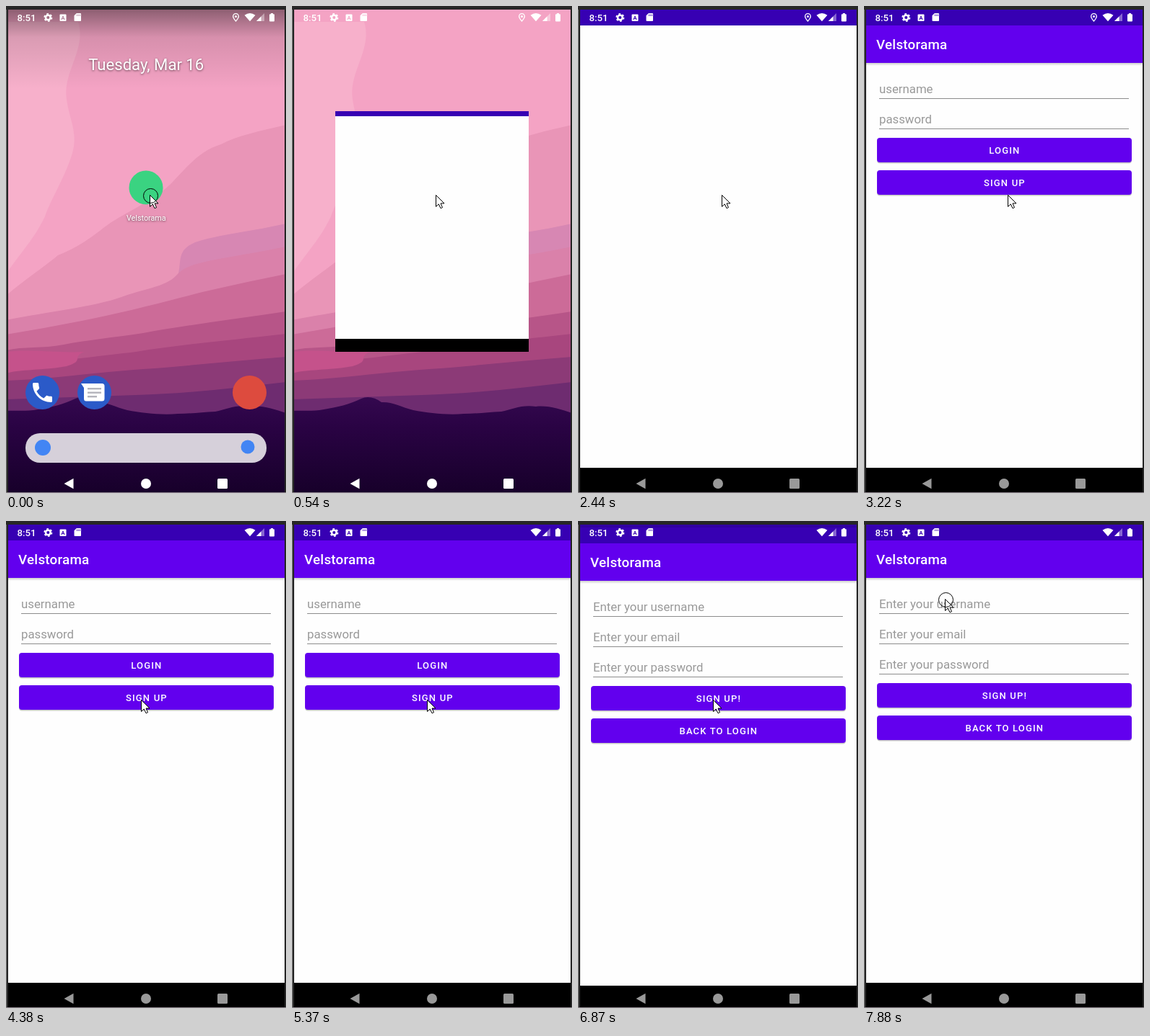
These frames come from a looping animation (388x676 px, 8 s). An HTML page:

```html
<!DOCTYPE html>
<html lang="en">
<head>
<meta charset="utf-8">
<title>App sign-up walkthrough</title>
<style>
  html, body { margin: 0; width: 100%; height: 100%; overflow: hidden; background: #262626; }
  svg { display: block; width: 388px; height: 676px; }
  text { font-family: Roboto, sans-serif; }
  .hint { font-size: 16.8px; fill: #999; }
  .label { font-size: 13px; font-weight: 500; letter-spacing: 1.16px; fill: #fff; text-anchor: middle; }
  .title { font-size: 18.8px; font-weight: 500; letter-spacing: .25px; fill: #fff; }
  .crisp { shape-rendering: crispEdges; }
</style>
</head>
<body>
<svg id="stage" viewBox="0 0 388 676" xmlns="http://www.w3.org/2000/svg"></svg>
<script>
const APP = 'Velstorama';
const LOOP = 8000;

const rect = (x, y, w, h, fill, more = '') =>
  `<rect x="${x}" y="${y}" width="${w}" height="${h}" fill="${fill}" ${more}/>`;
const circle = (x, y, r, fill, more = '') =>
  `<circle cx="${x}" cy="${y}" r="${r}" fill="${fill}" ${more}/>`;
const path = (d, fill, more = '') => `<path d="${d}" fill="${fill}" ${more}/>`;

// Wallpaper: each ridge is a top edge filled down to the bottom.
const ridges = [
  ['#e995b7', 'M388 165C350 174 320 180 298 192C270 200 252 222 232 243C205 272 165 285 135 308C110 328 92 338 72 346C48 366 28 378 0 402'],
  ['#da81aa', 'M388 334C350 342 315 347 285 353C262 358 246 362 236 374C222 390 185 394 160 404C120 418 60 424 0 436'],
  ['#cc6b98', 'M388 372C340 382 290 392 245 404C200 416 150 428 105 437C70 444 35 450 0 456'],
  ['#b75588', 'M388 424C320 434 250 443 190 454C150 460 110 464 80 470C50 476 25 472 0 478'],
  ['#a8467e', 'M388 455C310 464 240 470 180 480C130 486 60 494 0 500'],
  ['#8c3a77', 'M388 487C320 492 250 500 190 504C130 508 60 518 0 520'],
  ['#6e2c70', 'M388 522C320 530 250 538 180 540C120 542 60 544 0 546'],
  ['url(#hill)', 'M388 565C372 560 355 554 338 556C318 553 305 560 290 563C270 564 255 566 238 566C215 568 190 565 168 561C150 556 138 549 124 550C115 543 104 541 96 545C80 553 62 557 44 560C28 563 14 561 0 562']
];
const wallpaper = rect(0, 0, 388, 676, '#f4a3c4')
  + path('M0 22H100C112 60 78 92 84 130C88 158 100 176 92 204C82 238 62 268 54 292C40 322 22 340 0 372Z', '#f7b0cb')
  + ridges.map(([color, d], i) =>
      path(d + 'V676H388Z', color)
      + (i === 0 ? path('M388 302C345 312 290 318 262 328C236 340 244 352 238 376C270 360 340 350 388 336Z', '#d787b3') : '')
      + (i === 4 ? path('M0 480C40 476 70 482 108 480C90 488 110 492 84 500C50 506 20 504 0 510Z', '#c5528b') : '')
    ).join('');

const handset = 'M6.62 10.79c1.44 2.83 3.76 5.14 6.59 6.59l2.2-2.2c.27-.27.67-.36 1.02-.24 1.12.37 2.33.57 3.57.57.55 0 1 .45 1 1V20c0 .55-.45 1-1 1-9.39 0-17-7.61-17-17 0-.55.45-1 1-1h3.5c.55 0 1 .45 1 1 0 1.25.2 2.45.57 3.57.11.35.03.74-.25 1.02z';

const launcher = `<g id="launcher">
  ${rect(0, 5, 388, 110, 'url(#scrim)')}
  <g fill="#fff" text-anchor="middle" style="filter:drop-shadow(0 1px 1.5px rgba(0,0,0,.55))">
    <text x="194.2" y="89" font-size="22.1">Tuesday, Mar 16</text>
    <text x="194.3" y="297.5" font-size="10.8">${APP}</text>
  </g>
  ${circle(194, 252, 26, '#fff', 'id="glow" opacity=".35"')}
  ${circle(194, 252, 23.5, '#3ad381')}
  ${circle(50.5, 536.5, 23.5, '#2b5ac8')}
  ${path(handset, '#fff', 'transform="translate(32.5 518.5) scale(1.5)"')}
  ${circle(122.5, 536.5, 23.5, '#2b5ac8')}
  ${path('M104 524H133Q136.500 524 136.500 527.500V545Q136.500 548.500 133 548.500H111Q108 548.500 108 545V530Z', '#fff')}
  ${[530, 535.500, 541].map((y, i) => rect(113, y, i === 2 ? 13 : 19, 2.4, '#b4b4bc')).join('')}
  ${circle(337.5, 536.5, 23.5, '#dd4b3e')}
  ${rect(27, 593, 334, 41, '#d6d0da', 'rx="20"')}
  ${circle(51, 613, 11, '#4285f4')}
  ${circle(335, 612, 9.5, '#4285f4')}
</g>`;

const field = (y, hint) =>
  `<text class="hint" x="21" y="${y}">${hint}</text>` + rect(21, y + 7, 346, 1, '#8c8c8c', 'class="crisp"');
const button = (y, label, extra = '') =>
  rect(18, y + 1.5, 353, 34, '#000', 'rx="4" opacity=".22"')
  + rect(18, y, 353, 34, '#6200ee', 'rx="4"') + extra
  + `<text class="label" x="194.9" y="${y + 22}">${label}</text>`;
const page = body =>
  rect(3, 5, 383, 636, '#fefefe', 'class="crisp"')
  + rect(3, 5, 383, 22, '#3700b3', 'class="crisp"')
  + rect(3, 79, 383, 4, 'url(#drop)')
  + rect(3, 27, 383, 52, '#6200ee', 'class="crisp"')
  + `<text class="title" x="17" y="60">${APP}</text>` + body;

const ripple = `<g clip-path="url(#pill)">${circle(188, 249, 1, '#fff', 'id="ripple"')}</g>`;
const login = page(field(121, 'username') + field(163, 'password')
  + button(183, 'LOGIN') + button(228, 'SIGN UP', ripple));
const signup = page(field(121, 'Enter your username') + field(163, 'Enter your email')
  + field(205, 'Enter your password') + button(225, 'SIGN UP!') + button(270, 'BACK TO LOGIN'));

const navIcons = path('M80.500 663L93.500 655.800V670.200Z', 'inherit', 'stroke-linejoin="round"').replace('fill="inherit"', '')
  + '<circle cx="194" cy="663" r="7"/><rect x="293" y="656" width="14" height="14" rx="1.5"/>';

const statusIcons = `<g fill="#fff">
  <text x="15.6" y="21" font-size="13.2" font-weight="500">8:51</text>
  <circle cx="58.300" cy="16" r="3.300" fill="none" stroke="#fff" stroke-width="2.500"/>
  <circle cx="58.300" cy="16" r="5.100" fill="none" stroke="#fff" stroke-width="1.800" stroke-dasharray="2.670"/>
  <rect x="74.500" y="11.500" width="9" height="9.500" rx="1"/>
  <text id="letter" x="79" y="19" font-size="8" font-weight="700" text-anchor="middle">A</text>
  <path d="M97.800 10H103Q104 10 104 11V20Q104 21 103 21H95.500Q94.500 21 94.500 20V13.300Z"/>
  <path id="slots" d="M98.500 11.500V14M100.500 11.500V14M102.500 11.500V14" stroke-width=".8"/>
  <path id="pin" fill-rule="evenodd" d="M318.500 10C321.200 10 323 12 323 14.500C323 17.300 318.500 22 318.500 22S314 17.300 314 14.500C314 12 315.800 10 318.500 10ZM318.500 11.300A3.100 3.100 0 0 0 315.400 14.500C315.400 16.200 317.500 18.900 318.500 20C319.500 18.900 321.600 16.200 321.600 14.500A3.100 3.100 0 0 0 318.500 11.300ZM317 14.500A1.500 1.500 0 1 1 320 14.500A1.500 1.500 0 1 1 317 14.500Z"/>
  <path d="M330.500 12.800Q338 7.200 345.500 12.800L338 21.300Z"/>
  <path d="M358 10V21H347Z" opacity=".4"/><path d="M353.500 14.500V21H347Z"/>
  <path d="M367 10H370V11.300H371Q372 11.300 372 12.300V20.500Q372 21.500 371 21.500H366Q365 21.500 365 20.500V12.300Q365 11.300 366 11.300H367Z"/>
</g>`;

const stage = document.getElementById('stage');
stage.innerHTML = `<defs>
  <linearGradient id="scrim" x2="0" y2="1"><stop stop-opacity=".42"/><stop offset=".35" stop-opacity=".12"/><stop offset="1" stop-opacity="0"/></linearGradient>
  <linearGradient id="hill" x2="0" y2="1"><stop stop-color="#34084f"/><stop offset=".3" stop-color="#2a0344"/><stop offset="1" stop-color="#17002a"/></linearGradient>
  <linearGradient id="drop" x2="0" y2="1"><stop stop-opacity=".2"/><stop offset="1" stop-opacity="0"/></linearGradient>
  <clipPath id="pill"><rect x="18" y="228" width="353" height="34" rx="4"/></clipPath>
  <clipPath id="reveal"><rect id="shade" width="388" height="676"/></clipPath>
</defs>
<g id="home">${wallpaper}${launcher}</g>
<g id="window" class="crisp">
  <rect id="winNav" fill="#000"/><rect id="winBody" fill="#fefefe"/><rect id="winBar" fill="#3700b3"/>
</g>
<g id="login">${login}</g>
<rect id="dim" x="3" y="5" width="383" height="636" opacity=".1"/>
<g id="nav">${navIcons}</g>
<g id="signup" clip-path="url(#reveal)"><g id="slide">${signup}</g></g>
${statusIcons}
<g class="crisp">
  ${rect(0, 0, 388, 5, '#272727')}${rect(0, 5, 3, 671, '#252525')}${rect(0, 5, 1, 671, '#6b6b6b')}
  ${rect(386, 5, 2, 671, '#252525')}${rect(0, 675, 388, 1, '#8d858d')}
</g>
<g id="pointer">
  <path d="M.5 .5V16.500L4.300 13L7 18.800L9.500 17.700L7 12H12Z" fill="#fff" stroke="#000" stroke-linejoin="round"/>
  <circle id="ring" cx="1.500" cy="1.500" r="10" fill="none" stroke="#000"/>
</g>`;

const el = {};
stage.querySelectorAll('[id]').forEach(n => el[n.id] = n);
const set = (id, attrs) => { for (const k in attrs) el[id].setAttribute(k, attrs[k]); };
const show = (id, on) => { el[id].style.display = on ? '' : 'none'; };
const within = (t, a, b) => t >= a && t < b;

// Latest entry whose start time has passed.
const held = (steps, t) => {
  let now = steps[0];
  for (const s of steps) if (t >= s[0]) now = s;
  return now.slice(1);
};

// left, top, bar bottom, body bottom, right, bottom
const growth = [
  [540, 60, 146, 153, 462, 328, 480],
  [690, 9, 24, 37, 632, 380, 666],
  [830, 4, 9, 28, 639, 385, 673],
  [950, 3, 5, 27, 641, 386, 675]
];
const route = [
  [0, 199, 262], [3870, 197, 258], [4020, 193, 255], [4140, 190, 252], [4260, 188, 250],
  [4380, 187, 248], [7240, 165, 186], [7360, 137, 117], [7500, 119, 110], [7630, 112, 108]
];
const ink = [[0, '#fff'], [1430, '#d0d0d0'], [2440, '#999']];
// new page offset, reveal edge, old page offset
const handover = [[6720, 21, 175, -3], [6870, 4, 0, -11], [6990, 0, 0, 0]];
const waves = [[0, 0, 0], [5130, 110, .2], [5250, 200, .14], [5370, 0, 0]];

function draw(t) {
  show('home', t < 950);
  show('launcher', t < 540);
  show('glow', within(t, 280, 400));

  show('window', t >= 540);
  const [x, top, bar, body, right, end] = held(growth, t);
  const width = right - x;
  set('winBar', { x, y: top, width, height: bar - top });
  set('winBody', { x, y: bar, width, height: body - bar });
  set('winNav', { x, y: body, width, height: end - body });

  const [rise, edge, lift] = held(handover, t);
  show('login', within(t, 3220, 6990));
  set('login', { transform: `translate(0 ${t >= 6720 ? lift : 0})` });
  show('dim', within(t, 6720, 6990));
  show('signup', t >= 6720);
  set('slide', { transform: `translate(0 ${rise})` });
  set('shade', { y: edge });

  const [r, opacity] = held(waves, t);
  set('ripple', { r, opacity });

  set('nav', { fill: held(ink, t)[0] });
  const behind = t < 540 ? '#b07e98' : t < 950 ? '#f4a8c8' : '#3700b3';
  set('letter', { fill: behind });
  set('slots', { stroke: behind });
  show('pin', t < 3750);

  const [px, py] = held(route, t);
  set('pointer', { transform: `translate(${px} ${py})` });
  show('ring', t < 400 || within(t, 4880, 5250) || t >= 7880);
}

const start = performance.now();
function tick() {
  draw((performance.now() - start) % LOOP);
  requestAnimationFrame(tick);
}
tick();
</script>
</body>
</html>
```
